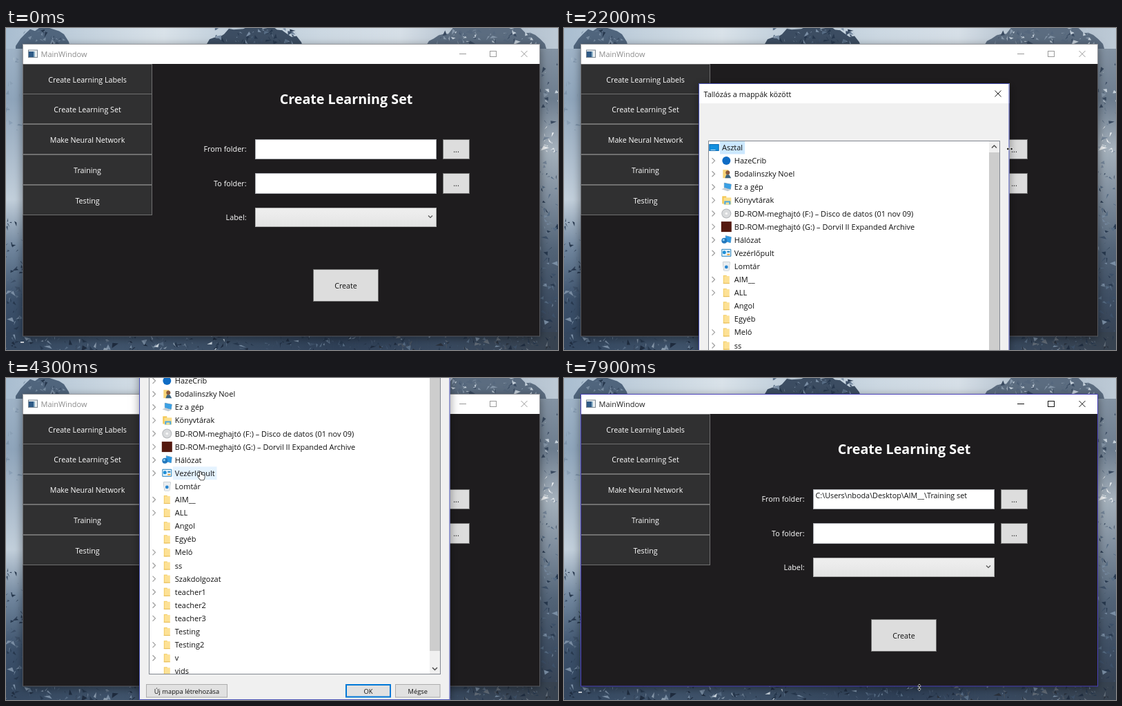
These frames come from a looping animation (800 by 466 pixels, 8000 ms). An HTML page with a canvas:

```html
<!DOCTYPE html>
<html lang="hu">
<head>
<meta charset="utf-8">
<title>Create Learning Set</title>
<style>
  html, body { margin: 0; width: 100%; height: 100%; overflow: hidden; background: #1e1c1e; }
  canvas { display: block; }
</style>
</head>
<body>
<canvas id="stage" width="800" height="466"></canvas>
<script>
const W = 800, H = 466, LOOP = 8000, STEP = 100;
const FONT = '"Open Sans", "Noto Sans", sans-serif';
const canvas = document.getElementById('stage');
let g = canvas.getContext('2d');

// ---------- helpers ----------
function box(x, y, w, h, fill, stroke, line = 1) {
  if (fill) { g.fillStyle = fill; g.fillRect(x, y, w, h); }
  if (stroke) {
    g.strokeStyle = stroke; g.lineWidth = line;
    g.strokeRect(x + line / 2, y + line / 2, w - line, h - line);
  }
}
function text(s, x, y, size, color, align = 'left', weight = 400) {
  g.font = `${weight} ${size}px ${FONT}`;
  g.textAlign = align; g.textBaseline = 'alphabetic';
  g.fillStyle = color; g.fillText(s, x, y);
}
function trace(pts, close) {
  g.beginPath();
  pts.forEach(([x, y], i) => i ? g.lineTo(x, y) : g.moveTo(x, y));
  if (close) g.closePath();
}
function line(pts, color, width = 1) {
  trace(pts); g.strokeStyle = color; g.lineWidth = width; g.stroke();
}
function poly(pts, fill, stroke, width = 1) {
  trace(pts, true);
  if (stroke) { g.strokeStyle = stroke; g.lineWidth = width; g.lineJoin = 'round'; g.stroke(); }
  if (fill) { g.fillStyle = fill; g.fill(); }
}
function disc(x, y, r, fill) {
  g.beginPath(); g.arc(x, y, r, 0, 7); g.fillStyle = fill; g.fill();
}
function cross(x, y, r, color) {
  line([[x - r, y - r], [x + r, y + r]], color);
  line([[x + r, y - r], [x - r, y + r]], color);
}
// keys: [time, x, y] with smooth steps between them
function follow(keys, t, ease = u => u * u * (3 - 2 * u)) {
  if (t <= keys[0][0]) return keys[0].slice(1);
  for (let i = 1; i < keys.length; i++) {
    const [t1, x1, y1] = keys[i], [t0, x0, y0] = keys[i - 1];
    if (t < t1) {
      const u = ease((t - t0) / (t1 - t0));
      return [x0 + (x1 - x0) * u, y0 + (y1 - y0) * u];
    }
  }
  return keys[keys.length - 1].slice(1);
}

// ---------- mountain wallpaper ----------
function paintWallpaper() {
  let seed = 11;
  const rnd = () => (seed = (seed * 16807) % 2147483647) / 2147483647;
  const fade = (x, y, w, h, colors, across) => {
    const gr = g.createLinearGradient(x, y, across ? x + w : x, across ? y : y + h);
    colors.forEach((c, i) => gr.addColorStop(i / (colors.length - 1), c));
    box(x, y, w, h, gr);
  };
  // rugged outline rising from both ends to a crest, its foot hidden by the window
  const ridge = (l, r, crest, color) => {
    const pts = [[l, 40]];
    for (let x = l; x <= r; x += 7) {
      const rise = Math.sin(Math.PI * (x - l) / (r - l)) ** .6;
      pts.push([x, 26 - rise * (26 - crest) + rnd() * 7]);
    }
    poly([...pts, [r, 40]], color);
  };
  const shards = (x, y, w, h, n, colors) => {
    for (let i = 0; i < n; i++) {
      const px = x + rnd() * w, py = y + rnd() * h, s = 2 + rnd() * 7, a = rnd() * 3;
      poly([[px, py], [px + s * Math.cos(a), py + s * Math.sin(a)], [px + s * (rnd() - .5), py + s * rnd()]],
        colors[Math.floor(rnd() * colors.length)]);
    }
  };
  const ROCK = ['#27384e', '#3d5068', '#566b83', '#7a8ea4'];
  const SNOW = ['#c6d1db', '#8798aa', '#394a60', '#55677d'];

  fade(0, 0, W, 40, ['#a9bdd0', '#c3d1dd', '#d9e2e9', '#b9c9d7', '#ccd8e2', '#d6dfe7', '#a7b6c5', '#bdcad6'], true);
  ridge(14, 96, -4, '#50657d');
  shards(28, 0, 54, 20, 26, ROCK);
  ridge(288, 434, -6, '#3c4d62');
  shards(302, 0, 118, 20, 60, ROCK);
  ridge(606, 786, -8, '#5b6c80');
  shards(624, 0, 145, 20, 80, SNOW);

  fade(0, 30, 40, H - 30, ['#9fb3c7', '#8fa5bb', '#a9bacb', '#c3d0dc', '#6f859d', '#3c516b', '#30435c'], false);
  shards(0, 40, 24, 110, 16, ['#7f95ac', '#a8bacb', '#8ba0b6']);
  shards(0, 275, 24, 175, 55, ROCK);
  fade(760, 30, 40, H - 30, ['#8493a3', '#6c7c8e', '#a5b1bc', '#7d8c9c', '#526377', '#3d4d62', '#343f4f'], false);
  shards(774, 45, 26, 90, 26, SNOW);
  shards(774, 138, 26, 60, 22, ['#eef1f3', '#dfe5ea', '#75869a']);
  shards(774, 205, 26, 245, 80, ROCK);

  fade(0, 440, W, 26, ['#34475f', '#3f536b', '#3a4d64', '#2f4057', '#38495f', '#37424f'], true);
  shards(0, 442, W, 24, 260, [...ROCK, '#1f2c3f']);
  shards(90, 444, 230, 20, 25, SNOW);
  shards(540, 444, 260, 20, 60, ['#2a313b', '#48525f', '#626c78']);
}
const wallpaper = document.createElement('canvas');
wallpaper.width = W; wallpaper.height = H;
const screen = g;
g = wallpaper.getContext('2d');
paintWallpaper();
g = screen;

// ---------- main window ----------
const MENU = ['Create Learning Labels', 'Create Learning Set', 'Make Neural Network', 'Training', 'Testing'];
const inside = ([x, y], l, t, r, b) => x >= l && x < r && y >= t && y < b;

function button(x, y, w, h, label, state) {
  const fill = ['#dddddd', '#bee6fd', '#c4e5f6'][state];
  box(x, y, w, h, fill, state ? '#3c7fb1' : '#707070');
  text(label, x + w / 2, y + h / 2 + 4, 10.7, '#111', 'center');
}

function mainWindow(t, cur, active, path) {
  g.save();
  g.shadowColor = 'rgba(0,0,0,.45)'; g.shadowBlur = 12; g.shadowOffsetY = 3;
  box(24, 23, 750, 423, '#1e1c1e');
  g.restore();
  box(24, 23, 750, 29, '#fff');
  const ink = active ? '#111' : '#999';
  box(32, 31.5, 14, 11.5, '#eef1f3', '#7b8690');
  box(33, 34, 7, 8, '#2f5a86'); box(40, 34, 2, 8, '#8fb2c8');
  text('MainWindow', 50.5, 42, 11, active ? '#222' : '#8c8c8c');
  line([[657, 37.5], [667, 37.5]], ink);
  box(701, 33, 10, 9, null, ink);
  cross(751, 37.5, 4.5, ink);

  MENU.forEach((s, i) => {
    const y = 52 + Math.floor(i * 43.8);
    box(24, y, 188, 44, '#303031', '#707070');
    text(s, 118, y + 26.5, 10.7, '#fff', 'center');
  });
  text('Create Learning Set', 493, 110, 19.7, '#fff', 'center', 700);
  ['From folder:', 'To folder:', 'Label:'].forEach((s, i) =>
    text(s, 348.5, [179, 229, 278][i], 10.8, '#fff', 'right'));
  box(361, 161, 263, 29, '#fff', '#abadb3');
  box(361, 210, 263, 30, '#fff', '#abadb3');
  const combo = g.createLinearGradient(0, 260, 0, 288);
  combo.addColorStop(0, '#f0f0f0'); combo.addColorStop(1, '#e3e3e3');
  box(361, 260, 263, 28, combo, '#acacac');
  line([[612, 271.5], [615, 274.5], [618, 271.5]], '#555', 1.2);
  if (path) text(path, 364.5, 174, 10.8, '#111');
  const over = inside(cur, 633, 161, 672, 190) && t < 1950;
  button(633, 161, 39, 29, '...', over ? (t === 1500 ? 2 : 1) : 0);
  button(633, 210, 39, 30, '...', 0);
  button(445, 349, 95, 47, 'Create', 0);
  box(24, 23, 750, 423.5, null, active ? '#4a41b8' : 'rgba(110,112,118,.7)');
}

// ---------- folder dialog ----------
const FOLDERS = ['AIM__>', 'ALL>', 'Angol', 'Egyéb', 'Meló>', 'ss>', 'Szakdolgozat>', 'teacher1>',
  'teacher2>', 'teacher3>', 'Testing', 'Testing2>', 'v>', 'vids'];
const folder = s => ({ name: s.replace('>', ''), icon: 'folder', more: s.endsWith('>'), level: 1 });
const place = (name, icon, more = true, level = 1) => ({ name, icon, more, level });
const ROWS = [
  place('Asztal', 'desk', false, 0),
  place('HazeCrib', 'cloud'),
  place('Bodalinszky Noel', 'user'),
  place('Ez a gép', 'pc'),
  place('Könyvtárak', 'libs'),
  place('BD-ROM-meghajtó (F:) – Disco de datos (01 nov 09)', 'disc'),
  place('BD-ROM-meghajtó (G:) – Dorvil II Expanded Archive', 'game'),
  place('Hálózat', 'net'),
  place('Vezérlőpult', 'panel'),
  place('Lomtár', 'bin', false),
  ...FOLDERS.map(folder)
];
const CHILDREN = ['Test set', 'Training for network', 'Training set']
  .map(s => place(s, 'folder', false, 2));
const OPENED = [...ROWS.slice(0, 11), ...CHILDREN, ...ROWS.slice(11)];

const ICONS = {
  desk(x, y) { box(x - 7, y - 5, 14, 10, '#1490df', '#0b6cb5'); box(x - 5, y + 3, 7, 1, '#bfe3fa'); },
  cloud(x, y) { disc(x, y, 6, '#0f6cc4'); },
  user(x, y) {
    box(x - 5, y - 6, 8, 12, '#f7d477');
    disc(x + 2, y - 2, 3, '#8a5a3c');
    poly([[x - 2, y + 6], [x, y + 1], [x + 4, y + 1], [x + 7, y + 6]], '#39627f');
  },
  pc(x, y) {
    poly([[x - 3, y - 6], [x + 7, y - 4], [x + 6, y + 3], [x - 3, y + 1]], '#3aa0e4', '#8fa3b3');
    poly([[x - 7, y + 3], [x - 2, y + 1], [x + 6, y + 4], [x + 2, y + 6]], '#c3ccd4');
  },
  libs(x, y) {
    box(x - 6, y - 6, 6, 11, '#f4c64f'); box(x - 4, y - 4, 11, 10, '#fbdf8c');
    box(x - 3, y + 1, 9, 5, '#4aa8e0'); box(x - 1, y + 3, 5, 3, '#fbdf8c');
  },
  disc(x, y) { disc(x, y, 7, '#b4b7ba'); disc(x, y, 6, '#d9dbdd'); disc(x, y, 1.8, '#f7f7f7'); },
  game(x, y) { box(x - 7.5, y - 7.5, 15, 15, '#54190f'); },
  net(x, y) {
    poly([[x - 1, y - 6], [x + 7, y - 4], [x + 6, y + 4], [x - 1, y + 2]], '#2f98e2', '#7fa3bd');
    disc(x - 3, y + 1, 4, '#2277bd'); disc(x - 4, y, 1.6, '#8cd0f2');
  },
  panel(x, y) {
    box(x - 7, y - 6, 14, 11, '#e8f5fd', '#2a83bd');
    disc(x - 3, y - 1, 2.5, '#1f8fd6'); box(x + 1, y - 3, 4, 2, '#2a83bd'); box(x + 1, y + 1, 4, 2, '#f0a73c');
  },
  bin(x, y) {
    poly([[x - 5, y - 6], [x + 5, y - 6], [x + 3.5, y + 6], [x - 3.5, y + 6]], '#e9edf0', '#a9b2b9');
    disc(x, y + 1, 2.4, '#2a86d0');
  },
  folder(x, y) {
    box(x - 4.5, y - 6, 5, 12, '#f2cb62'); box(x - 3.5, y - 5, 8, 11, '#fde195');
    box(x - 4.5, y + 5, 9, 1, '#e5bb55');
  }
};

const rowY = i => 173 + i * 19.1;
const LIST_BOTTOM = 617;

function dialog(t, dx, dy, cur) {
  const open = t >= 5000, rows = open ? OPENED : ROWS, chosen = t >= 6500 ? 13 : 0;
  const cx = cur[0] - dx, cy = cur[1] - dy;
  const hit = Math.round((cy - 173) / 19.1);
  let hand = false;
  g.save();
  g.translate(dx, dy);
  g.save();
  g.shadowColor = 'rgba(0,0,0,.4)'; g.shadowBlur = 12; g.shadowOffsetY = 3;
  box(195, 80, 450.5, 574, '#f0f0f0');
  g.restore();
  box(195, 80, 450.5, 29, '#fff');
  text('Tallózás a mappák között', 202.5, 99.5, 10.9, '#111');
  cross(629, 95, 4.5, '#222');
  box(209, 163, 423, LIST_BOTTOM - 163, '#fff', '#828790');

  g.save();
  g.beginPath(); g.rect(210, 164, 406, LIST_BOTTOM - 165); g.clip();
  rows.forEach((r, i) => {
    const y = rowY(i), tx = 229 + r.level * 17.8;
    g.font = `400 11px ${FONT}`;
    const w = g.measureText(r.name).width;
    const over = i === hit && cx > tx - 19 && cx < tx + w + 3;
    hand = hand || over;
    if (i === chosen || over)
      box(tx - 3, y - 9.5, w + 6, 19, i === chosen ? '#cce8ff' : '#e5f3ff');
    if (r.more) {
      if (open && i === 10) line([[213, y - 2], [216.5, y + 2], [220, y - 2]], '#333', 1.3);
      else line([[214.5, y - 4], [218.5, y], [214.5, y + 4]], i === hit && cx < 224 && cx > 210 ? '#3fb6e8' : '#a0a0a0', 1.3);
    }
    ICONS[r.icon](tx - 11.5, y);
    text(r.name, tx, y + 4, 11, '#111');
  });
  g.restore();

  box(616, 164, 15, LIST_BOTTOM - 165, '#f0f0f0');
  box(616, 180, 15, (open ? 538 : 583) - 180, '#cdcdcd');
  line([[620, 173.5], [623.5, 170], [627, 173.5]], '#505050', 1.5);
  line([[620, 607], [623.5, 610.5], [627, 607]], '#505050', 1.5);

  const ok = cx > 494 && cx < 560 && cy > 631 && cy < 651;
  const plain = (x, w, s) => {
    box(x, 631, w, 19.5, '#e1e1e1', '#adadad');
    text(s, x + w / 2, 644.5, 9.3, '#111', 'center');
  };
  plain(205, 118, 'Új mappa létrehozása');
  plain(566, 65.5, 'Mégse');
  box(494, 631, 66, 19.5, ok ? (t >= 7500 ? '#cce4f7' : '#e5f1fb') : '#e1e1e1', '#0078d7', ok ? 1 : 2);
  text('OK', 527, 644.5, 9.3, '#111', 'center');
  box(195, 80, 450.5, 574, null, '#4850b4');
  g.restore();

  if (t >= 5900 && t < 6500) {
    box(281, 245, 203, 17, 'rgba(0,0,0,.35)');
    box(278, 242, 203.5, 18, '#fff', '#767676');
    text('Létrehozás dátuma: 2019. 07. 30. 20:53', 282, 255, 10.7, '#575757');
  }
  return hand;
}

// ---------- pointer ----------
const POINTERS = {
  arrow: () => poly([[0, 0], [0, 11], [2.6, 8.6], [4.4, 12.4], [6, 11.6], [4.3, 8], [7.6, 8]], '#fff', '#000', 1.4),
  hand: () => poly([[0, 0], [1.6, 0], [1.8, 4], [6.8, 5.2], [6.6, 9], [5.4, 11.5], [1, 11.5],
    [-2.6, 7], [-2, 6], [0, 7.4]], '#fff', '#222', 1.5),
  busy() {
    g.beginPath(); g.arc(0, 0, 3.7, 0, 7);
    g.strokeStyle = '#1583d8'; g.lineWidth = 2.4; g.stroke();
  },
  resize() {
    poly([[-4.5, 0], [-2, -1.8], [-2, 1.8]], '#000', '#fff', 1.2);
    poly([[4.5, 0], [2, -1.8], [2, 1.8]], '#000', '#fff', 1.2);
    line([[-2, 0], [2, 0]], '#fff', 2);
    line([[-2, 0], [2, 0]], '#000', .8);
  }
};
function pointer(kind, [x, y], turn = 0) {
  g.save(); g.translate(x, y); g.rotate(turn); POINTERS[kind](); g.restore();
}

// ---------- timeline ----------
const DRAG = [[2800, 0, 0], [3000, 8, -32], [3400, -8, -127], [3800, -2, -188]];
const CURSOR = [
  [700, 620, 500], [1300, 645, 171], [1900, 645, 171], [2000, 646, 175], [2300, 646, 175],
  [2700, 480, 95], [3800, 478, -93], [4200, 281, 136], [4500, 281, 136], [4900, 214, 175],
  [5200, 214, 175], [5500, 295, 231], [6600, 295, 231], [7100, 515, 448]
];

function draw(t) {
  const [dx, dy] = follow(DRAG, t, u => u);
  const cur = t >= 2800 && t < 3800 ? [480 + dx, 95 + dy] : follow(CURSOR, t);
  const shown = t >= 1950 && t < 7600, done = t >= 7600;
  g.drawImage(wallpaper, 0, 0);
  if (!shown) box(21, 454, 5, 1.5, '#fff');
  mainWindow(t, cur, done, done ? 'C:\\Users\\nboda\\Desktop\\AIM__\\Training set' : '');
  const hand = shown && dialog(t, dx, dy, cur);
  if (done) pointer('resize', cur, Math.PI / 2);
  else if (t >= 2000 && t < 2400) pointer('resize', cur);
  else if (t >= 1600 && t < 2000) pointer('busy', cur);
  else pointer(hand ? 'hand' : 'arrow', cur);
}

function frame() {
  const t = performance.now() % LOOP;
  draw(Math.floor(t / STEP) * STEP);
  requestAnimationFrame(frame);
}
frame();
</script>
</body>
</html>
```
